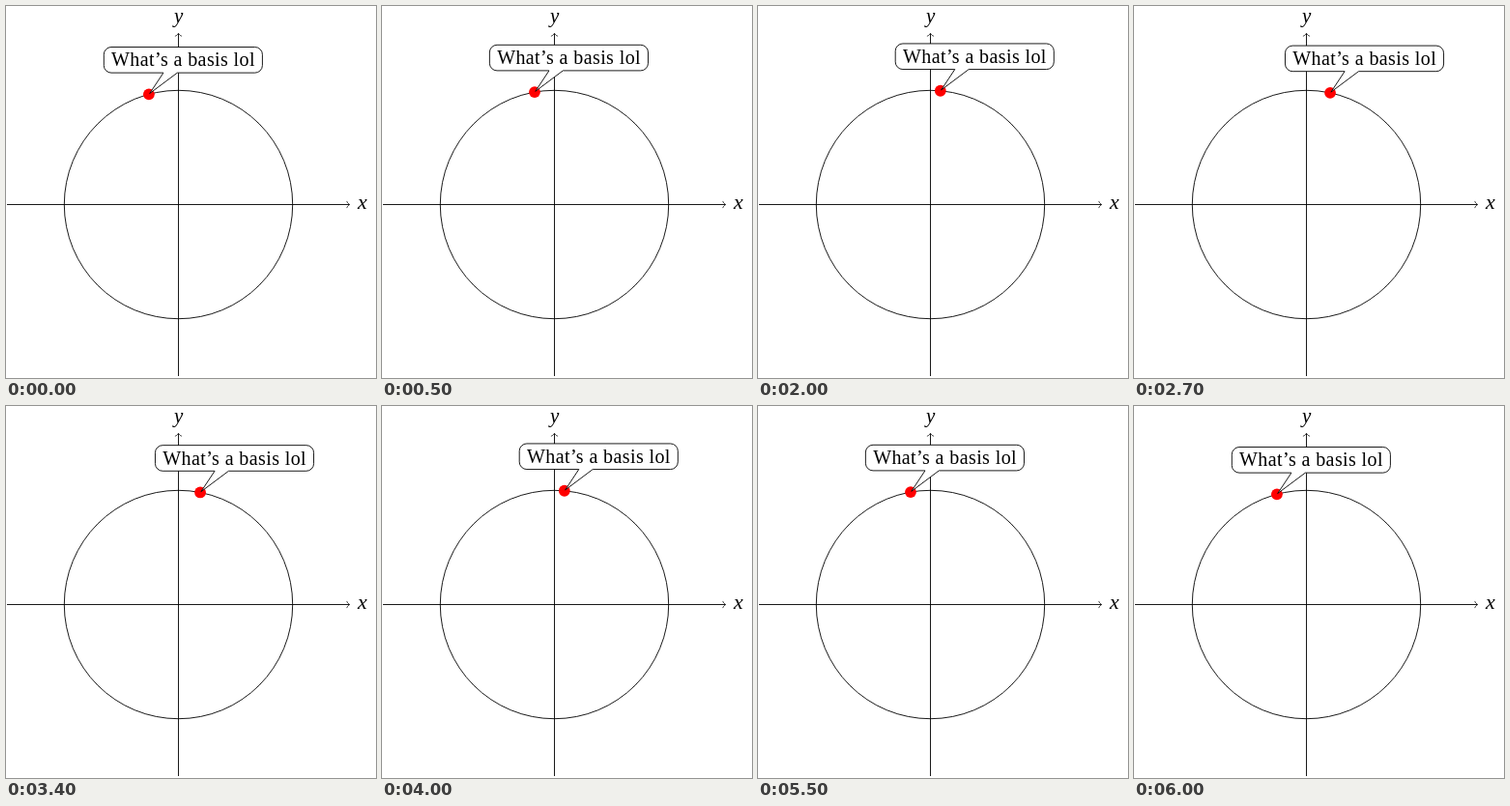
Animation, 383 px wide and 385 px high, one loop 6.1 s. Source, as an HTML page with a canvas:

```html
<!DOCTYPE html>
<html lang="en">
<head>
<meta charset="utf-8">
<title>Point on a circle</title>
<style>
  html, body { margin: 0; width: 100%; height: 100%; overflow: hidden; background: #fff; }
  canvas { display: block; }
</style>
</head>
<body>
<canvas id="stage" width="383" height="385"></canvas>
<script>
const ctx = document.getElementById('stage').getContext('2d');
const STEP = 100, STEPS = 61;
const CX = 178.5, CY = 205.5, RADIUS = 118.2, AXIS = 177.5;
const LINE = 0.9;
const SERIF = '"Liberation Serif", "Times New Roman", serif';

function axis(angle) {
  ctx.save();
  ctx.translate(CX, CY);
  ctx.rotate(angle);
  ctx.lineCap = 'butt';
  ctx.beginPath();
  ctx.moveTo(-AXIS, 0);
  ctx.lineTo(AXIS - 0.6, 0);
  ctx.stroke();

  // Curved barbs of the arrow tip
  ctx.translate(AXIS - 0.8, 0);
  ctx.scale(0.8, 0.8);
  ctx.lineCap = ctx.lineJoin = 'round';
  ctx.beginPath();
  ctx.moveTo(-3, -4);
  ctx.bezierCurveTo(-2.75, -2.5, 0, -0.25, 0.75, 0);
  ctx.bezierCurveTo(0, 0.25, -2.75, 2.5, -3, 4);
  ctx.stroke();
  ctx.restore();
}

function label(text, x, y, font, spacing = '0px') {
  ctx.font = `${font} ${SERIF}`;
  ctx.letterSpacing = spacing;
  ctx.textAlign = 'center';
  ctx.fillStyle = '#000';
  ctx.fillText(text, x, y);
}

// Speech bubble whose pointer ends at the current origin
function bubble() {
  const left = -46.6, right = 117.5, top = -48.8, bottom = -22.2, r = 7.7;
  ctx.beginPath();
  ctx.moveTo(0.8, -0.8);
  ctx.lineTo(15, bottom);
  ctx.arcTo(left, bottom, left, top, r);
  ctx.arcTo(left, top, right, top, r);
  ctx.arcTo(right, top, right, bottom, r);
  ctx.arcTo(right, bottom, left, bottom, r);
  ctx.lineTo(29.4, bottom);
  ctx.closePath();
  ctx.fillStyle = '#fff';
  ctx.fill();
  ctx.stroke();
  label('What’s a basis lol', 35.6, -28.9, '20px', '0.4px');
}

function draw(now) {
  const step = Math.floor(now / STEP) % STEPS;
  const degrees = 75 + Math.abs(30 - step);
  const angle = degrees * Math.PI / 180;

  ctx.fillStyle = '#fff';
  ctx.fillRect(0, 0, 383, 385);
  ctx.strokeStyle = '#000';
  ctx.lineWidth = LINE;

  axis(0);
  axis(-Math.PI / 2);
  label('x', 369, 209.7, 'italic 22px');
  label('y', 178.7, 17, 'italic 21px');

  ctx.beginPath();
  ctx.arc(CX, CY, RADIUS, 0, 2 * Math.PI);
  ctx.stroke();

  ctx.save();
  ctx.translate(CX + RADIUS * Math.cos(angle), CY - RADIUS * Math.sin(angle));
  ctx.beginPath();
  ctx.arc(0, 0, 5.9, 0, 2 * Math.PI);
  ctx.fillStyle = '#f00';
  ctx.fill();
  bubble();
  ctx.restore();
}

let start;
function tick(now) {
  start ??= now;
  draw(now - start);
  requestAnimationFrame(tick);
}
draw(0);
requestAnimationFrame(tick);
</script>
</body>
</html>
```
